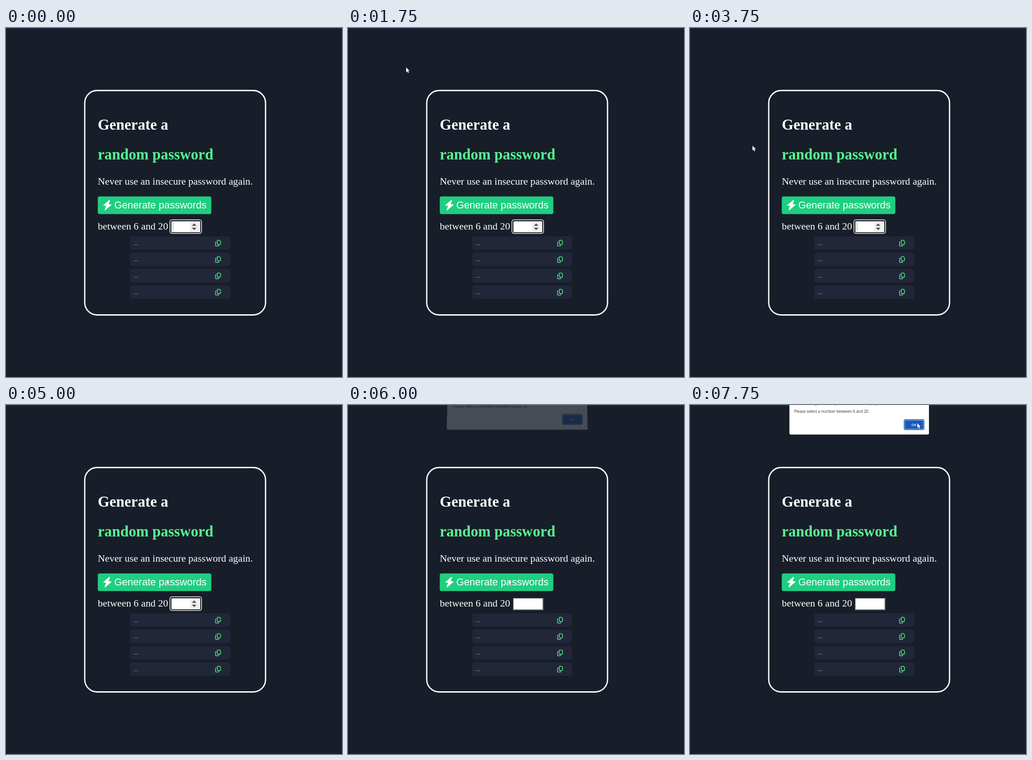
Recreate the animation shown at these times as an HTML page. Size 734x762 px, loop 8000 ms.

```html
<!DOCTYPE html>
<html lang="en">
<head>
<meta charset="utf-8">
<title>Password generator</title>
<style>
html, body { margin: 0; width: 100%; height: 100%; overflow: hidden; background: #181e29; }
svg { display: block; width: 734px; height: 762px; }
.serif { font-family: "Liberation Serif", "Times New Roman", serif; font-size: 21.87px; fill: #fff; }
.head { font-size: 32.8px; font-weight: bold; }
.sans { font-family: "Liberation Sans", Arial, sans-serif; }
.ui { font-family: "Open Sans", "Noto Sans", sans-serif; fill: #303033; }
.green { fill: #55f991; }
</style>
</head>
<body>
<svg viewBox="0 0 734 762">
  <rect width="734" height="762" fill="#181e29"/>
  <rect width="734" height="1" fill="#34365f"/>

  <rect x="172" y="136.5" width="395" height="490" rx="27" fill="none" stroke="#fff" stroke-width="2.8"/>
  <text class="serif head" x="200.5" y="222">Generate a</text>
  <text class="serif head green" x="200.5" y="287">random password</text>
  <text class="serif" x="200.5" y="341.5">Never use an insecure password again.</text>

  <rect x="200.5" y="367.7" width="248" height="38.6" rx="4" fill="#1fce80"/>
  <path d="M226.3 376.2 213.6 387H220L216.4 397 229.4 386H223Z" fill="#fff" stroke="#fff" stroke-width="2" stroke-linejoin="round"/>
  <text class="sans" x="236.4" y="394" font-size="21.87" fill="#fff">Generate passwords</text>

  <text class="serif" x="200.5" y="440">between 6 and 20</text>
  <g id="focused">
    <rect x="358.2" y="418.7" width="69" height="29.8" rx="4.5" fill="#0d0f13" stroke="#fff" stroke-width="1.5"/>
    <rect x="361.3" y="422" width="63" height="24" rx="1.5" fill="#fff"/>
    <rect x="402" y="423" width="21" height="22" fill="#efefef"/>
    <path d="M406 432h10l-5-5.2zM406 436h10l-5 5.2z" fill="#505050"/>
    <rect id="caret" x="364.2" y="424.5" width="1.2" height="19" fill="#7fb99a"/>
  </g>
  <g id="blurred">
    <path d="M359.5 420.5H427L425 422.5H361.5V446L359.5 448Z" fill="#2b2d31"/>
    <path d="M427 420.5V448H359.5L361.5 446H425V422.5Z" fill="#717277"/>
    <rect x="361.3" y="422.2" width="63.7" height="24" fill="#fff"/>
  </g>
  <g id="rows"></g>

  <g id="dialog">
    <path id="panel" fill="#fff"/>
    <g id="content">
      <text class="ui" x="227.6" y="-.6" font-size="9.6">passcoding for many visitors most happy</text>
      <text class="ui" x="227.6" y="17.4" font-size="8.4">Please select a number between 6 and 20.</text>
      <rect x="467.8" y="31.8" width="43.4" height="22" rx="3" fill="#cfe0f5" stroke="#1b57a8" stroke-width="1.5"/>
      <rect x="469.4" y="33.4" width="40.2" height="18.8" rx="1.8" fill="#195abb"/>
      <text class="ui" x="489.2" y="45.6" font-size="7.6" font-weight="600" text-anchor="middle" style="fill:#fff">OK</text>
    </g>
  </g>

  <path id="cursor" d="M0 0V10.6L2.4 8.4 4.1 12.2 5.9 11.4 4.3 7.7H7.5Z" fill="#fff" stroke="#0b0d12" stroke-width=".8" stroke-linejoin="round" paint-order="stroke"/>
</svg>
<script>
const LOOP = 8000, STEP = 250, BLINK = 1060, ALERT = 6000;
const $ = id => document.getElementById(id);
const show = (id, on) => $(id).setAttribute("visibility", on ? "inherit" : "hidden");

// Pointer stops: time, x, y
const stops = [
  [500, 5, 135], [1000, 90, 101], [1750, 127, 86], [2500, 95, 82],
  [2750, 78, 79], [3250, 42, 175], [3750, 136.5, 257], [4250, 275, 340],
  [4750, 350.5, 381], [7250, 350.5, 381], [7500, 364, 325], [7750, 496.5, 39.5]
];

function pointer(t) {
  let i = 0;
  while (i < stops.length - 2 && t >= stops[i + 1][0]) i++;
  const [a, ax, ay] = stops[i], [b, bx, by] = stops[i + 1];
  const p = Math.min(1, Math.max(0, (t - a) / (b - a)));
  return [ax + (bx - ax) * p, ay + (by - ay) * p];
}

$("rows").innerHTML = [0, 1, 2, 3].map(i => `
  <g transform="translate(271 ${455 + i * 35.67})">
    <rect width="218.5" height="29" rx="6" fill="#212738"/>
    <text class="sans green" x="7" y="18.5" font-size="13.3">...</text>
    <g fill="none" stroke="#55f991" stroke-width="1.4" stroke-linejoin="round">
      <path d="M191.8 8.5h3.6l2.2 2.2v5.8a1.2 1.2 0 0 1-1.2 1.2h-4.6a1.2 1.2 0 0 1-1.2-1.2v-6.8a1.2 1.2 0 0 1 1.2-1.2z"/>
      <path d="M189 11.9h-1.1a1.2 1.2 0 0 0-1.2 1.2v6.8a1.2 1.2 0 0 0 1.2 1.2h4.6a1.2 1.2 0 0 0 1.2-1.2v-1.2"/>
    </g>
  </g>`).join("");

function draw(now) {
  const t = Math.floor(now % LOOP / STEP) * STEP;
  const open = t >= ALERT, fading = t === ALERT;

  show("focused", !open);
  show("caret", !open && t % BLINK < 580);
  show("blurred", open);

  show("dialog", open);
  $("dialog").setAttribute("opacity", fading ? 0.2 : 1);
  $("content").setAttribute("transform", fading ? "translate(.7 -11.2)" : "");
  $("panel").setAttribute("d", fading
    ? "M217 0H522.3L523.6 51.5Q523.6 53.7 521.4 53.7H218Q215.7 53.7 215.7 51.5Z"
    : "M217.2 0H522V61.5Q522 64.5 519 64.5H220.2Q217.2 64.5 217.2 61.5Z");

  show("cursor", t >= stops[0][0]);
  $("cursor").setAttribute("transform", `translate(${pointer(t)})`);
}

let start;
function tick(now) {
  start ??= now;
  draw(now - start);
  requestAnimationFrame(tick);
}
draw(0);
requestAnimationFrame(tick);
</script>
</body>
</html>
```
